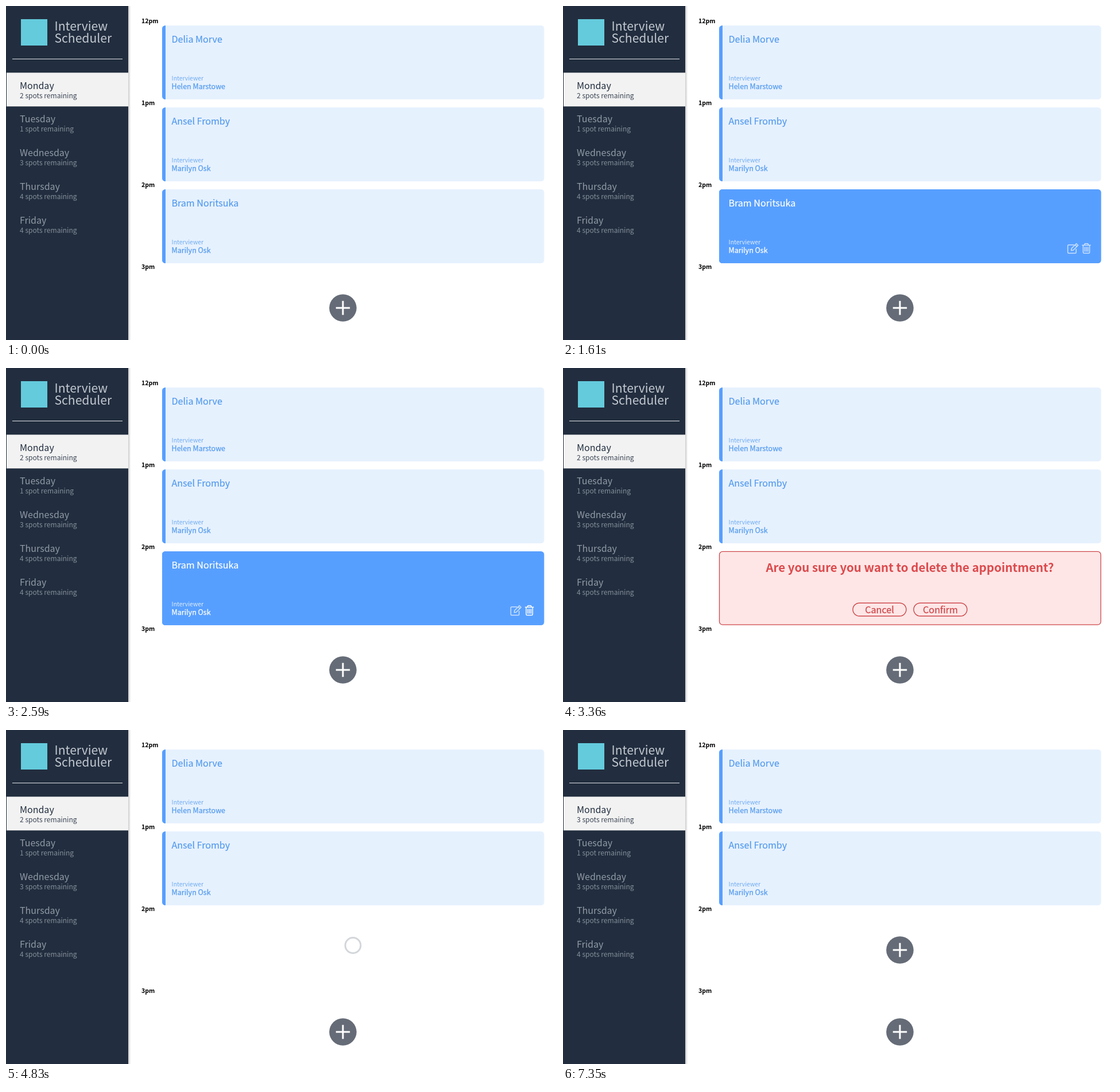
Animation, 960 px wide and 583 px high, one loop 7.49 s. Source, as an HTML page:

```html
<!DOCTYPE html>
<html lang="en">
<head>
<meta charset="utf-8">
<title>Interview Scheduler</title>
<style>
  html, body { margin: 0; width: 100%; height: 100%; overflow: hidden; background: #fff; }
  svg { display: block; width: 100vw; height: 100vh; }
  text { font-family: "Noto Sans CJK JP", "Noto Sans CJK SC", "Noto Sans CJK", "Noto Sans", sans-serif; }
  .brand { font-size: 21.1px; font-weight: 300; fill: #c3c9d1; }
  .day { font-size: 16px; }
  .spots { font-size: 12.05px; font-weight: 300; }
  .time { font-size: 10.6px; font-weight: 700; fill: #000; }
  .name { font-size: 16.1px; stroke-width: .2px; }
  .label { font-size: 10.4px; font-weight: 300; opacity: .82; }
  .host { font-size: 12.5px; stroke-width: .25px; }
  .ask { font-size: 20.5px; font-weight: 600; fill: #dc4a4d; text-anchor: middle; }
  .btn { font-size: 16.2px; text-anchor: middle; stroke-width: .25px; }
  .icon { fill: none; stroke: #fff; stroke-width: 1.5; stroke-linecap: round; stroke-linejoin: round; }
</style>
</head>
<body>
<svg id="stage" viewBox="0 0 960 583" preserveAspectRatio="none">
  <defs>
    <linearGradient id="shade">
      <stop offset="0" stop-color="#000" stop-opacity=".2"/>
      <stop offset="1" stop-color="#000" stop-opacity="0"/>
    </linearGradient>
    <clipPath id="round"><rect x="272" width="665.6" height="129" rx="5.5"/></clipPath>
  </defs>
</svg>
<script>
const LOOP = 7490;
const HOVER = 1610, TRASH_IN = 2310, TRASH_LIT = 2590;
const ASK = 3360, CONFIRM = 3990, STATUS = 4550, EMPTY = 5320;
const BLUE = '#579fff', RED = '#ee5253', EDGE = '#cd474b', NAVY = '#222e3f';
const stage = document.getElementById('stage');

function el(tag, attrs, parent = stage) {
  const node = document.createElementNS('http://www.w3.org/2000/svg', tag);
  for (const key in attrs) node.setAttribute(key, attrs[key]);
  parent.append(node);
  return node;
}
const rect = (x, y, width, height, fill, parent, more) =>
  el('rect', { x, y, width, height, fill, ...more }, parent);
function text(cls, x, y, str, fill, parent) {
  const node = el('text', { class: cls, x, y }, parent);
  if (fill) node.setAttribute('fill', fill);
  node.textContent = str;
  return node;
}
const group = (y = 0) => el('g', { transform: `translate(0 ${y})` });
const show = (node, on) => node.setAttribute('visibility', on ? 'visible' : 'hidden');

// Sidebar
rect(213, 0, 4.5, 583, 'url(#shade)');
rect(0, 0, 213, 583, NAVY);
rect(26, 23, 46, 46, '#64cbdc');
text('brand', 84.5, 42.8, 'Interview');
text('brand', 84.5, 64.3, 'Scheduler');
rect(11, 92, 192, 1, '#dfe2e6');
rect(1, 116.4, 212, 58.9, '#f2f2f2');

const days = [['Monday', 2], ['Tuesday', 1], ['Wednesday', 3], ['Thursday', 4], ['Friday', 4]];
const spotLabel = n => `${n} spot${n > 1 ? 's' : ''} remaining`;
const spots = days.map(([day, n], i) => {
  const y = 144.5 + i * 58.8;
  text('day', 24, y, day, i ? '#919aa5' : NAVY);
  return text('spots', 24, y + 16, spotLabel(n), i ? '#858e99' : '#3c4655');
});

// Schedule
['12pm', '1pm', '2pm', '3pm'].forEach((hour, i) => text('time', 236, 30.3 + 143 * i, hour));

function card(y, name, host, active) {
  const g = group(y);
  const box = el('g', { 'clip-path': 'url(#round)' }, g);
  rect(272, 0, 666, 129, active ? BLUE : '#e6f1fe', box);
  rect(272, 0, 6, 129, BLUE, box);
  const ink = active ? '#fff' : '#549bed';
  text('name', 288.4, 30, name, ink, g).setAttribute('stroke', ink);
  text('label', 288.6, 96, 'Interviewer', ink, g);
  text('host', 288.6, 111.2, host, ink, g).setAttribute('stroke', ink);
  return g;
}

function plus(y) {
  const g = group(y);
  el('circle', { cx: 587, cy: 0, r: 23.8, fill: '#656c77' }, g);
  el('path', { d: 'M574.8 0h24.4M587 -12.2v24.4', stroke: '#fff', 'stroke-width': 3 }, g);
  return g;
}

function button(x, label) {
  const g = group();
  const shape = rect(x, 410.2, 93, 22.8, 'none', g, { rx: 11.4, 'stroke-width': 1.4 });
  const caption = text('btn', x + 46.5, 427.8, label, '', g);
  return filled => {
    const ink = filled ? '#fff' : EDGE;
    shape.setAttribute('fill', filled ? RED : 'none');
    shape.setAttribute('stroke', filled ? RED : EDGE);
    caption.setAttribute('fill', ink);
    caption.setAttribute('stroke', ink);
  };
}

card(34, 'Delia Morve', 'Helen Marstowe');
card(177, 'Ansel Fromby', 'Marilyn Osk');
plus(527);

const last = ['Bram Noritsuka', 'Marilyn Osk'];
const idle = card(320, ...last);
const hover = card(320, ...last, true);
el('path', {
  class: 'icon', opacity: .7,
  d: 'M890 97H881Q879.5 97 879.5 98.5V110Q879.5 111.5 881 111.5H892.5Q894 111.5 894 110V104.5' +
     'M886 103.2L894.4 94.8L897.4 97.8L889 106.2L885.5 106.7ZM892.3 96.9L895.3 99.9'
}, hover);
const trash = el('path', {
  class: 'icon',
  d: 'M904.8 97.5H919M908.2 97L909.3 94.8H914.5L915.6 97' +
     'M906.3 97.8V110Q906.3 111.6 907.9 111.6H915.9Q917.5 111.6 917.5 110V97.8' +
     'M909.2 101V108.3M911.9 101V108.3M914.6 101V108.3'
}, hover);

const ask = group();
rect(272.5, 320.4, 664.5, 127.8, '#fee6e6', ask, { rx: 5.5, stroke: EDGE, 'stroke-width': 1.3 });
text('ask', 604.3, 356, 'Are you sure you want to delete the appointment?', '', ask);
const fillCancel = button(505, 'Cancel');
ask.append(stage.lastChild);
const fillConfirm = button(611, 'Confirm');
ask.append(stage.lastChild);
fillCancel(false);

const status = el('circle', { cx: 604.5, cy: 376, fill: 'none', stroke: '#d3d6da', 'stroke-width': 3 });
const add = plus(384);

function draw(t) {
  show(idle, t < HOVER);
  show(hover, t >= HOVER && t < ASK);
  show(ask, t >= ASK && t < STATUS);
  show(status, t >= STATUS && t < EMPTY);
  show(add, t >= EMPTY);

  const lit = Math.min(1, Math.max(0, (t - TRASH_IN) / (TRASH_LIT - TRASH_IN)));
  trash.setAttribute('opacity', .7 + .3 * lit);
  fillConfirm(t >= CONFIRM);
  status.setAttribute('r', 14 + 3 * Math.cos((t - STATUS) / 500 * Math.PI));
  spots[0].textContent = spotLabel(t < EMPTY ? 2 : 3);
}

const start = performance.now();
function tick() {
  draw((performance.now() - start) % LOOP);
  requestAnimationFrame(tick);
}
draw(0);
requestAnimationFrame(tick);
</script>
</body>
</html>
```
